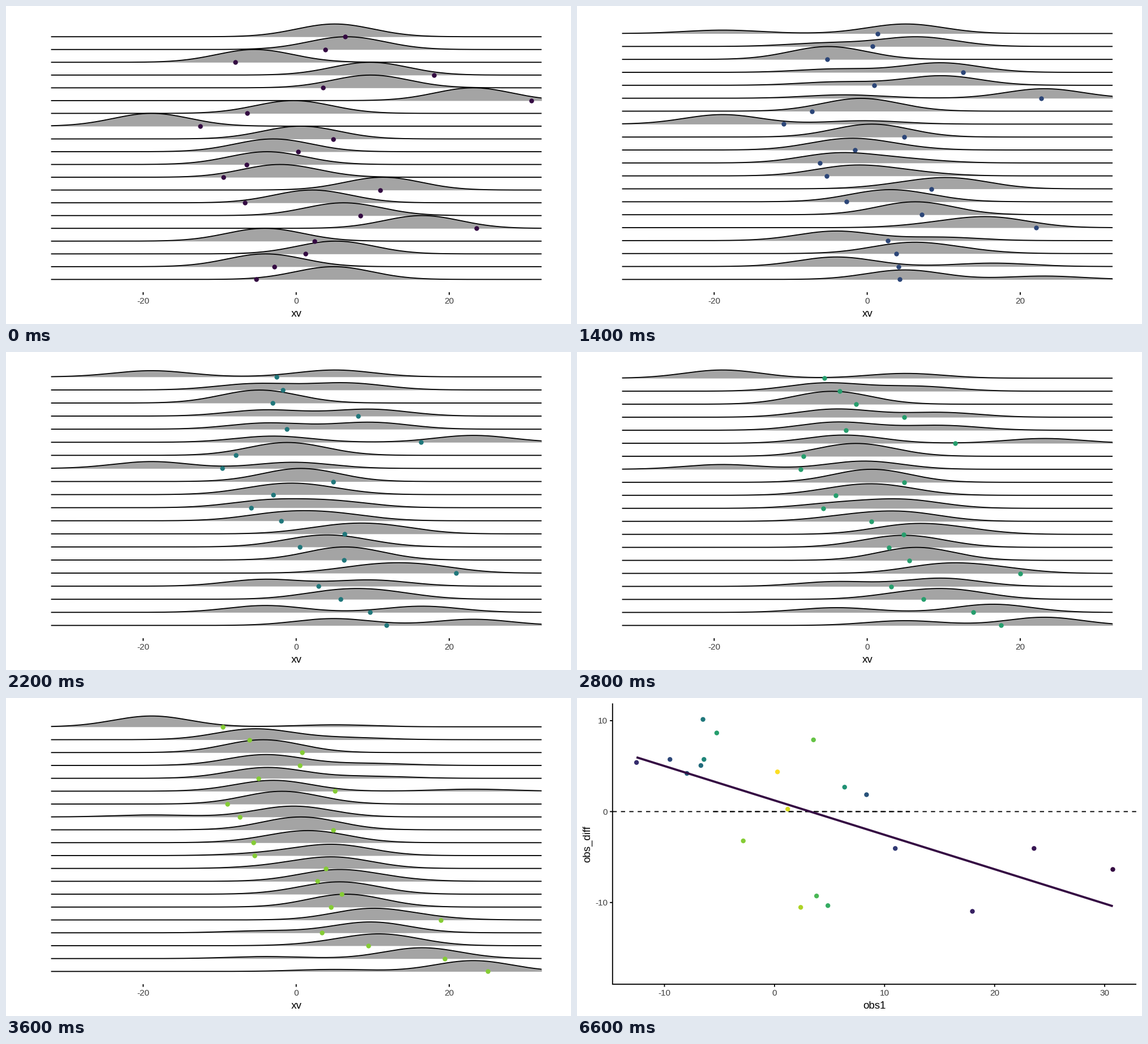
Write a matplotlib script that moves like this. It is 998 by 561 pixels and loops after 9 s.

```python
import numpy as np
import matplotlib.pyplot as plt
from matplotlib.animation import FuncAnimation

W, H, DPI = 998, 561, 64
PT = 72 / DPI  # points per pixel
plt.rcParams["font.family"] = "Liberation Sans"
plt.rcParams["path.snap"] = False

STEP_MS, FRAMES = 200, 45
HOLD, STEPS = 2, 19
ARROWS_AT, SCATTER_AT = 21, 33
LINE, TICK = 1.85, 4.7
TOP, BOTTOM = 31.7, 482.4
SIGMA = 5

# Rows sorted by true mean, top to bottom.
MEANS = np.array([-18.9, -5.4, -4.1, -4.0, -3.8, -3.0, -2.1, -0.35, 0.6, 2.1,
                  4.9, 5.05, 5.15, 6.2, 6.6, 9.65, 9.75, 11.35, 16.45, 23.15])
OBS = np.array([-12.54, -7.96, 2.38, -2.84, -6.50, 0.27, -9.50, -6.41, 4.85, -6.69,
                -5.25, 6.37, 1.20, 8.36, 3.82, 17.98, 3.54, 10.97, 23.58, 30.74])
DIFF = np.array([5.40, 4.20, -10.53, -3.22, 10.14, 4.37, 5.74, 5.74, -10.34, 5.07,
                 8.65, 2.69, 0.27, 1.86, -9.28, -10.97, 7.89, -4.05, -4.05, -6.36])
# Starting row of each sorted entry.
START_ROW = np.array([8, 3, 17, 19, 11, 10, 12, 7, 9, 14,
                      20, 1, 18, 15, 2, 4, 5, 13, 16, 6]) - 1
SHUFFLED = np.argsort(START_ROW)

PRIMARIES = np.array([[0.972, 0.0245, 0.0035],
                      [0.0, 0.9705, 0.0295],
                      [0.002, 0.012, 0.986]])


def tone(rgb):
    """Convert sRGB to the slightly darker gamma 1.8 display space."""
    rgb = np.asarray(rgb)
    linear = np.where(rgb <= 0.04045, rgb / 12.92, ((rgb + 0.055) / 1.055) ** 2.4)
    return (linear @ PRIMARIES.T) ** (1 / 1.8)


def viridis(u):
    return tone(plt.get_cmap("viridis")(u)[..., :3] if np.ndim(u)
                else plt.get_cmap("viridis")(float(u))[:3])


PURPLE = viridis(0.0)
FILL = tone([0.702] * 3)
LABEL = tone([0.302] * 3)

fig = plt.figure(figsize=(W / DPI, H / DPI), dpi=DPI, facecolor="white")
ax = fig.add_axes([0, 0, 1, 1])

GRID = np.linspace(-32.04, 32.07, 600)


def ridge_x(v):
    return 512.6 + 13.515 * v


def scatter_x(v):
    return 348.9 + 19.44 * v


def scatter_y(v):
    return 200.4 - 16.04 * v


def bell(mean):
    return np.exp(-0.5 * ((GRID - mean[:, None]) / SIGMA) ** 2)


BELLS_START, BELLS_END = bell(MEANS[SHUFFLED]), bell(MEANS)


def line(xs, ys, width=LINE, color="black", **kw):
    kw.setdefault("solid_capstyle", "butt")
    ax.plot(xs, ys, color=color, lw=width * PT, **kw)


def text(x, y, s, size, color="black", ha="center", **kw):
    ax.text(x, y, s, fontsize=size * PT, color=color, ha=ha, va="baseline", **kw)


def dots(x, y, color):
    ax.scatter(x, y, s=(8.4 * PT) ** 2, c=color, linewidths=0, zorder=5)


def x_axis(values, to_px, title, title_x):
    for v in values:
        x = to_px(v)
        line([x, x], [504.9, 504.9 + TICK])
        text(x, 524.6, str(v), 15.2, LABEL)
    text(title_x, 547.5, title, 18.8)


def draw_ridges(p):
    heights = (1 - p) * BELLS_START + p * BELLS_END
    spacing = (BOTTOM - TOP) / (19 + heights[0].max())
    bases = BOTTOM - spacing * np.arange(19, -1, -1)
    xs = ridge_x(GRID)
    for i, (base, h) in enumerate(zip(bases, heights)):
        ys = base - spacing * h
        z = 1 + i * 0.1
        ax.fill_between(xs, base, ys, color=FILL, lw=0, zorder=z)
        line(xs, ys, zorder=z + 0.05)
    x_axis((-20, 0, 20), ridge_x, "xv", 512.7)
    return bases


def draw_arrow(x0, x1, y):
    side = np.sign(x1 - x0)
    back = x1 - side * 5.0
    line([x0, x1 - side * 2], [y, y], 2.2, PURPLE, zorder=5)
    ax.fill([x1, back, back], [y, y - 2.9, y + 2.9], facecolor=PURPLE,
            edgecolor=PURPLE, lw=1.9 * PT, joinstyle="round", zorder=5)


def draw_scatter():
    left, right, bottom = 62.8, 988, 504.9
    zero = scatter_y(0)
    dash_unit = LINE * PT
    line([left, right], [zero, zero], linestyle=(0, (4, 4)))
    # The central part of the zero line is heavier.
    line([left + 24 * 4 * LINE, 588], [zero, zero], linestyle=(0, (5, 3)))
    rank = np.argsort(np.argsort(-np.abs(OBS)))
    dots(scatter_x(OBS), scatter_y(DIFF), viridis(rank / 19))
    slope, intercept = np.polyfit(OBS, DIFF, 1)
    ends = np.array([OBS.min(), OBS.max()])
    line(scatter_x(ends), scatter_y(slope * ends + intercept), 3.8, PURPLE, zorder=6)

    line([left, left, right], [9.5, bottom, bottom], solid_joinstyle="miter")
    for v in (10, 0, -10):
        y = scatter_y(v)
        line([left - TICK, left], [y, y])
        text(54.3, y + 5.4, str(v), 15.2, LABEL, ha="right")
    x_axis((-10, 0, 10, 20, 30), scatter_x, "obs1", 525.3)
    text(23, 257.6, "obs_diff", 18.8, rotation=90, rotation_mode="anchor")


def draw(frame):
    ax.clear()
    ax.set_xlim(0, W)
    ax.set_ylim(H, 0)
    ax.axis("off")
    if frame >= SCATTER_AT:
        draw_scatter()
    elif frame >= ARROWS_AT:
        bases = draw_ridges(1.0)
        for obs, diff, y in zip(OBS, DIFF, bases):
            draw_arrow(ridge_x(obs), ridge_x(obs + diff), y)
    else:
        p = max(0, frame - HOLD) / STEPS
        bases = draw_ridges(p)
        obs = (1 - p) * OBS[SHUFFLED] + p * OBS
        dots(ridge_x(obs), bases, [viridis(p)])
    return []


anim = FuncAnimation(fig, draw, frames=FRAMES, interval=STEP_MS,
                     init_func=lambda: [], repeat=True, repeat_delay=0)
plt.show()
```
